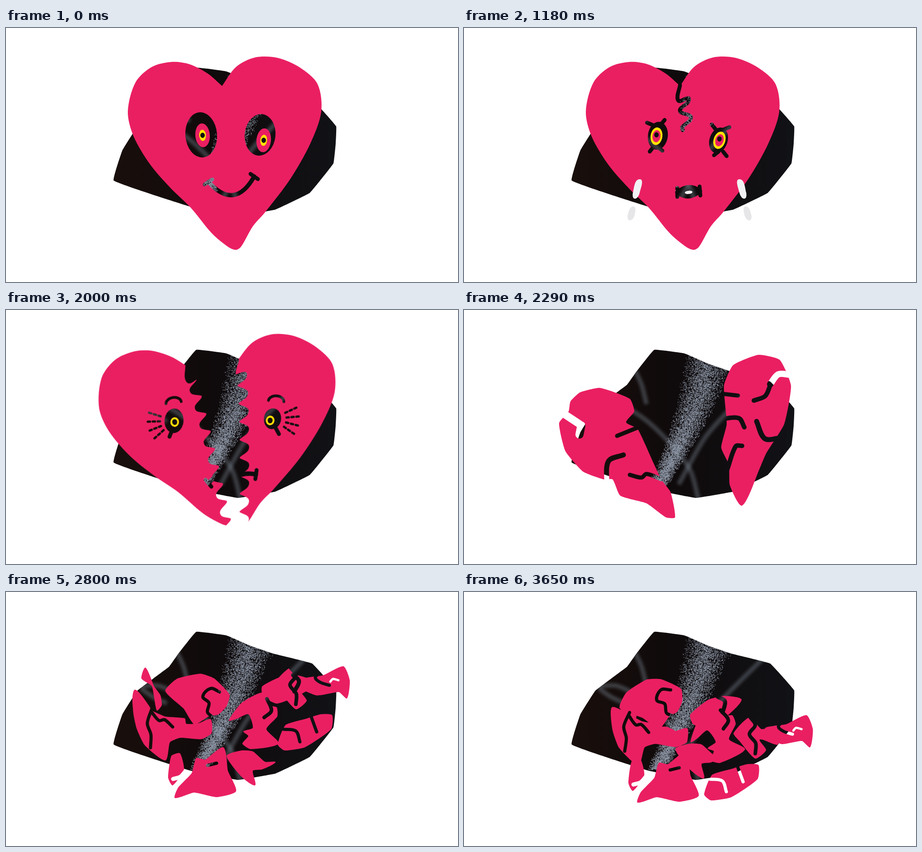
Write an HTML page with a canvas that moves like this. It is 998 by 561 pixels and loops after 3.98 s.

```html
<!DOCTYPE html>
<html lang="en">
<head>
<meta charset="utf-8">
<title>Breaking heart</title>
<style>
html, body { margin: 0; width: 100%; height: 100%; overflow: hidden; background: #fff; }
canvas { display: block; }
</style>
</head>
<body>
<canvas id="stage" width="998" height="561"></canvas>
<script>
const W = 998, H = 561, LOOP = 3980;
const PINK = '#ea1f62', YELLOW = '#ffe300', BLACK = '#100d0e';
const SPLIT = 14, TEAR = 17, SHATTER = 20, LAST = 26;

const ctx = document.getElementById('stage').getContext('2d');
const sheet = () => Object.assign(document.createElement('canvas'), { width: W, height: H });
const layer = sheet(), pen = layer.getContext('2d');
const nums = s => s.trim().split(/\s+/).map(Number);
const rad = deg => deg * Math.PI / 180;

// Step starts: a steady beat of 130 ms, a quick rip, then 170 ms.
const STEPS = [0, 2060, 2120];
for (let i = 0; i < 14; i++) STEPS.push(140 + i * 130);
for (let i = 0; i < 10; i++) STEPS.push((i ? 2120 : 1830) + i * 170);
STEPS[STEPS.indexOf(1830)] = 1830;
STEPS.push(2000);
STEPS.sort((a, b) => a - b);

// Smooth path through a flat list of coordinates; a doubled point makes a corner.
function curve(list, closed = false, k = 0.3) {
  const n = list.length / 2, path = new Path2D();
  const at = i => {
    i = closed ? (i + n) % n : Math.max(0, Math.min(n - 1, i));
    return [list[2 * i], list[2 * i + 1]];
  };
  const heading = i => {
    const [a, b] = [at(i - 1), at(i + 1)];
    const x = b[0] - a[0], y = b[1] - a[1], len = Math.hypot(x, y) || 1;
    return [x / len, y / len];
  };
  path.moveTo(...at(0));
  for (let i = 0; i < (closed ? n : n - 1); i++) {
    const [b, c, u, v] = [at(i), at(i + 1), heading(i), heading(i + 1)];
    const r = k * Math.hypot(c[0] - b[0], c[1] - b[1]);
    path.bezierCurveTo(b[0] + u[0] * r, b[1] + u[1] * r, c[0] - v[0] * r, c[1] - v[1] * r, ...c);
  }
  if (closed) path.closePath();
  return path;
}

const HEART = nums(`477 128 477 128 446 101 405 80 365 75 322 86 286 120 269 185 282 240 318 301 362 352
  408 397 455 454 490 483 507 490 519 483 545 438 572 407 628 333 672 255 696 185 688 124 650 88
  600 66 550 65 508 86`);
const PAPER = nums(`420 88 487 96 540 119 590 136 676 158 729 217 728 255 723 299 671 364 595 401
  512 415 405 394 238 337 257 270 290 218 360 165 380 137`);

// Zigzag of even teeth along a slightly bent spine.
const CRACK = [477, 126, 473, 160];
for (let k = 0; k < 9; k++) {
  const y = 155 + k * 39.7, x = 478 + 30 * Math.sqrt((y - 126) / 364);
  CRACK.push(x + 9, y, x + 8, y + 9, x - 9, y + 24, x - 8, y + 31);
}
CRACK.push(508, 496);
const CRACK_POINTS = CRACK.length / 2;

// eyes: x y rx ry tilt, twice; gaze: iris centres; iris: ratio, radii (pink, yellow, core, pupil), pupil drop;
// lashes: strokes around the eye centre, x pointing outwards;
// mouth: corners, control x, upper and lower control y, tick angles.
const SAD_LASHES = nums('15 -31 4 -46 15 -31 35 -23 1 40 12 57 -12 34 -42 40');
const FACES = [
  [0, {
    eyes: nums('431 236 35 50 -.08 561 236 34 46 .1'),
    gaze: nums('434 237 569 248'),
    iris: nums('1.65 16 7.5 0 5 0'),
    lashes: SAD_LASHES.map(() => 0),
    mouth: nums('447 340 548 328 505 404 404 -33 35')
  }],
  [3, {
    eyes: nums('429 238 29 41 -.12 567 240 28 40 .08'),
    gaze: nums('432 236 568 249'),
    iris: nums('1.75 14 7.5 0 6 6'),
    lashes: SAD_LASHES,
    mouth: nums('468 374 537 376 500 333 333 17 -30')
  }],
  [9, {
    eyes: nums('428 238 22 31 .14 562 248 20 29 .3'),
    gaze: nums('425 239 564 248'),
    iris: nums('1.5 5 13 9 5 -3'),
    lashes: nums('12 -24 24 -29 -7 -25 -15 -35 10 25 18 35 0 25 -10 33'),
    mouth: nums('471 363 521 360 496 342 382 90 85')
  }],
  [13, {
    eyes: nums('427 241 21 27 .25 562 251 19 23 .1'),
    gaze: nums('428 244 557 255'),
    iris: nums('1.1 9.5 9.5 0 5.5 0'),
    lashes: nums('0 -10 0 -10 0 -10 0 -10 8 20 16 33 0 10 0 10'),
    mouth: nums('478 390 532 376 503 370 370 60 95')
  }]
];

// Shards: outline | cuts that begin with their width.
const shard = text => {
  const [edge, ...cuts] = text.split('|').map(nums);
  const mean = o => edge.filter((v, j) => j % 2 === o).reduce((a, b) => a + b) * 2 / edge.length;
  return { edge, cuts, x: mean(0), y: mean(1) };
};
const TORN = [
  `257 190 278 170 322 160 388 184 398 212 380 236 405 250 440 325 458 363 478 390 488 446 468 446
   425 415 367 398 350 362 330 362 285 345 246 300 232 238 253 212
   | 17 224 205 277 240 | 18 281 243 277 263 | 9 360 266 412 245 | 11 337 372 341 322 374 308
   | 9 388 352 414 358 425 350 458 362`,
  `552 155 572 110 628 87 675 98 700 155 685 240 645 305 628 345 592 420 565 375 563 330 546 292 558 240
   | 14 654 152 672 130 697 131 | 10 655 152 643 178 618 188 | 9 548 173 583 177
   | 10 550 228 585 227 597 247 | 11 624 234 642 272 674 271 | 10 560 338 578 289 592 288`
].map(shard);

// Each piece: step on which it starts to slide, its slide (dx, dy, degrees), its shape.
const BROKEN = [
  [24, 100, 85, -54, '308 167 327 208 341 228 344 250 333 262 322 208 299 191'],
  [24, 66, 9, 30, '284 216 315 250 321 265 283 265'],
  [24, 38, 12, 5, `282 250 321 262 352 275 395 279 398 291 425 290 452 281 454 312 431 325 385 322
    362 332 352 372 306 338 288 300
    | 7 322 258 312 290 320 315 319 344 | 7 322 266 338 284 350 282 368 298`],
  [22, -14, 16, -40, `369 185 402 168 455 175 480 195 500 240 485 262 462 273 440 270 405 276 394 235
    | 7 481 227 465 213 443 224 451 242 441 260 449 275`],
  [23, 7, 30, -17, `492 284 520 245 566 222 582 250 598 255 599 275 575 303 602 335 540 347 522 335
    535 318 524 308 545 300 535 270 510 280 | 8 576 236 586 262 570 277`],
  [24, 3, 105, 0, `592 203 627 168 654 194 690 187 690 228 650 217 664 240 640 259 605 220
    | 8 629 168 640 185 627 205 641 225 640 248`],
  [22, -128, 98, -25, `627 172 630 150 680 137 715 144 747 168 700 188 654 194
    | 9 702 140 712 156 697 176`],
  [25, 10, 96, 0, `654 192 700 184 745 164 759 195 753 235 735 221 690 228 660 212
    | 7 690 180 683 190 695 200 714 206 | 5 716 198 722 192 734 195`],
  [25, -62, 98, 0, `617 294 662 280 695 270 720 272 718 303 660 343 615 350 600 337
    | 7 612 303 640 307 649 331 | 7 674 276 686 309`],
  [23, 10, 10, 0, `420 367 440 370 480 343 490 395 508 440 465 453 415 443 373 455 380 432 410 400
    | 7 445 383 465 378`],
  [23, 5, 12, 0, '365 362 384 356 393 392 368 427 358 410 | 9 369 413 385 408 397 395'],
  [23, -20, -15, 0, '487 362 520 350 545 352 572 375 595 376 565 392 545 395 550 427 520 408']
].map(([wake, dx, dy, turn, text]) => ({ wake, dx, dy, turn, ...shard(text) }));

function makePaper() {
  const cv = sheet(), c = cv.getContext('2d');
  let seed = 7;
  const rnd = () => (seed = seed * 16807 % 2147483647) / 2147483647;
  c.clip(curve(PAPER, true, 0.06));
  const g = c.createLinearGradient(240, 0, 730, 0);
  g.addColorStop(0, '#190f0c');
  g.addColorStop(0.45, '#0f0a0b');
  g.addColorStop(1, '#111216');
  c.fillStyle = g;
  c.fillRect(0, 0, W, H);

  c.filter = 'blur(3px)';
  c.strokeStyle = 'rgba(125,137,150,.4)';
  c.lineWidth = 10;
  ['376 130 392 165 403 208', '296 208 340 208 400 242 460 300 500 355 518 420',
    '298 213 325 232 355 246', '660 147 575 232 530 285 474 385']
    .forEach(s => c.stroke(curve(nums(s))));
  c.filter = 'none';

  for (let i = 0; i < 9500; i++) {
    const t = rnd(), u = 1 - t, half = 59 - 37 * t;
    const x = u * u * 545 + 2 * t * u * 509 + t * t * 425 + (rnd() + rnd() - 1) * half;
    c.fillStyle = `rgba(150,160,176,${0.45 + rnd() * 0.5})`;
    c.fillRect(x, 100 + t * 292, 1.4, 1.4);
  }
  return cv;
}
const paper = makePaper();

function reset() {
  pen.setTransform(1, 0, 0, 1, 0, 0);
  pen.globalCompositeOperation = 'source-over';
  pen.clearRect(0, 0, W, H);
  pen.lineCap = pen.lineJoin = 'round';
  pen.fillStyle = PINK;
}
function line(list, width) {
  pen.lineWidth = width;
  pen.stroke(curve(list));
}
function oval(x, y, rx, ry, tilt = 0, color = BLACK) {
  pen.fillStyle = color;
  pen.beginPath();
  pen.ellipse(x, y, rx, ry, tilt, 0, 7);
  pen.fill();
}

function faceAt(step) {
  const i = Math.min(FACES.length - 2, FACES.filter(f => f[0] <= step).length - 1);
  const [s0, a] = FACES[i], [s1, b] = FACES[i + 1];
  const t = Math.min(1, (step - s0) / (s1 - s0));
  return Object.fromEntries(Object.keys(a).map(k => [k, a[k].map((v, j) => v + (b[k][j] - v) * t)]));
}

// Brow and a fan of dashes beside an eye.
function drawWrinkles(x, y, out) {
  pen.lineWidth = 6;
  pen.beginPath();
  pen.ellipse(x + 6, y - 39, 17, 12, 0, rad(185), rad(360));
  pen.stroke();
  for (let angle = -28; angle <= 32; angle += 20) {
    const cos = Math.cos(rad(angle)) * out, sin = Math.sin(rad(angle));
    for (let r = 31; r < 56; r += 11) {
      line([x + cos * r, y + sin * r, x + cos * (r + 5), y + sin * (r + 5)], 5);
    }
  }
}

function cutEye(eye, lashes, out, wrinkled) {
  const [x, y] = eye;
  oval(...eye);
  for (let i = 0; i < lashes.length; i += 4) {
    const [a, b, c, d] = lashes.slice(i, i + 4);
    line([x + a * out, y + b, x + c * out, y + d], 8.5);
  }
  if (wrinkled) drawWrinkles(x, y, out);
}

function cutMouth([lx, ly, rx, ry, cx, upper, lower, leftTick, rightTick]) {
  pen.lineWidth = 9.5;
  pen.beginPath();
  pen.moveTo(lx, ly);
  pen.quadraticCurveTo(cx, upper, rx, ry);
  pen.quadraticCurveTo(cx, lower, lx, ly);
  pen.fill();
  pen.stroke();
  [[lx, ly, leftTick], [rx, ry, rightTick]].forEach(([x, y, deg]) => {
    const dx = Math.cos(rad(deg)) * 10, dy = Math.sin(rad(deg)) * 10;
    line([x - dx, y - dy, x + dx, y + dy], 8.5);
  });
}

function drawIris(x, y, [ratio, pink, yellow, core, pupil, drop], tilt) {
  oval(x, y, pink, pink * ratio, tilt, PINK);
  oval(x, y, yellow, yellow * ratio, tilt, YELLOW);
  oval(x, y, core, core * ratio, tilt, PINK);
  oval(x, y + drop, pupil, pupil * 1.15);
}

function drawHeart(step) {
  reset();
  pen.fill(curve(HEART, true));
  pen.globalCompositeOperation = 'destination-out';
  if (step >= 6) {
    const grown = Math.min(1, (step - 5) / 8) ** 2;
    line(CRACK.slice(0, 2 * Math.max(2, Math.round(CRACK_POINTS * grown))), 8.5);
  }
  const f = faceAt(step), left = f.eyes.slice(0, 5), right = f.eyes.slice(5);
  cutEye(left, f.lashes, -1, step >= 12);
  cutEye(right, f.lashes, 1, step >= 12);
  cutMouth(f.mouth);
  pen.globalCompositeOperation = 'source-over';
  drawIris(f.gaze[0], f.gaze[1], f.iris, left[4]);
  drawIris(f.gaze[2], f.gaze[3], f.iris, right[4]);
  if (step >= 8 && step <= 10) oval(496, 363, 8.5, 3.6, -0.1, '#f2f2f4');
}

function tear(x0, y0, x1, y1, w, color) {
  const mx = x0 + (x1 - x0) * 0.68, my = y0 + (y1 - y0) * 0.68;
  ctx.fillStyle = color;
  ctx.fill(curve([x0, y0, mx + w, my, x1, y1, mx - w, my], true, 0.35));
}
function drawTears(step) {
  const dx = (step - 9) * 6, dy = (step - 9) * 26;
  for (const side of [-1, 1]) {
    const x = d => 498 + side * (d + dx);
    tear(x(110), 334 + dy, x(121), 377 + dy, 7.5, '#f1f1f3');
    tear(x(124), 394 + dy, x(132), 425 + dy, 7.5, '#e6e6e9');
  }
}

// One side of the cracked heart, swung outwards about its tip.
function drawHalf(side, step) {
  const open = step - SPLIT;
  ctx.save();
  ctx.translate(507 + side * (8 + 3 * open), 490 - 7 * open);
  ctx.rotate(rad(side < 0 ? -8 - open : 3));
  ctx.translate(-507, -490);
  const area = curve(CRACK), far = side < 0 ? 0 : W;
  [[508, H], [far, H], [far, -50], [477, -50]].forEach(p => area.lineTo(...p));
  ctx.clip(area);
  ctx.drawImage(layer, 0, 0);
  ctx.restore();
}

// place(piece, index) gives dx, dy and a turn in degrees about the piece's middle.
function drawShards(set, place) {
  reset();
  const each = act => set.forEach((piece, i) => {
    const [dx, dy, turn] = place(piece, i);
    pen.setTransform(1, 0, 0, 1, piece.x + dx, piece.y + dy);
    pen.rotate(rad(turn));
    pen.translate(-piece.x, -piece.y);
    act(piece);
  });
  each(p => pen.fill(curve(p.edge, true, 0.16)));
  pen.globalCompositeOperation = 'destination-out';
  each(p => p.cuts.forEach(([w, ...pts]) => line(pts, w)));
  ctx.drawImage(layer, 0, 0);
}

const drift = step => (p, i) => [(i ? 1 : -1) * Math.abs(step - 18) * 22, (step - 18) * 12, 0];
const burst = p => [(p.x - 500) * 0.11, (p.y - 270) * 0.32 + 8, 0];
const slide = step => p => {
  const t = Math.max(0, (step - p.wake + 1) / (LAST + 1 - p.wake));
  const eased = 1 - (1 - t) ** 3;
  return [p.dx * eased, p.dy * eased, p.turn * eased];
};

function draw(step) {
  ctx.fillStyle = '#fff';
  ctx.fillRect(0, 0, W, H);
  ctx.drawImage(paper, 0, 0);
  if (step < SPLIT) {
    drawHeart(step);
    ctx.drawImage(layer, 0, 0);
    if (step >= 6 && step <= 10) drawTears(step);
  } else if (step < TEAR) {
    drawHeart(step);
    drawHalf(-1, step);
    drawHalf(1, step);
  } else if (step < SHATTER) {
    drawShards(TORN, drift(step));
  } else {
    drawShards(BROKEN, step === SHATTER ? burst : slide(step));
  }
}

const start = performance.now();
let shown = -1;
function tick() {
  const t = (performance.now() - start) % LOOP;
  const step = STEPS.filter(s => s <= t).length - 1;
  if (step !== shown) draw(shown = step);
  requestAnimationFrame(tick);
}
tick();
</script>
</body>
</html>
```
